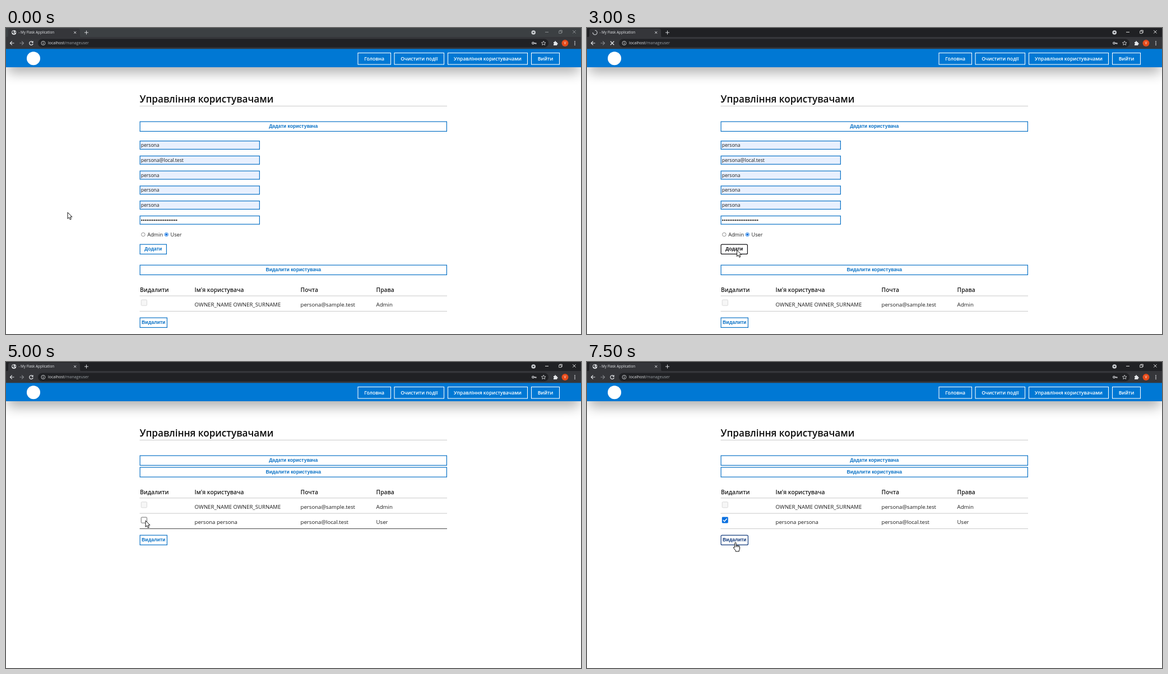
Recreate the animation shown at these times as an HTML page. Size 1026x546 px, loop 8 s.

```html
<!DOCTYPE html>
<html lang="uk">
<head>
<meta charset="utf-8">
<title>My Flask Application</title>
<style>
html, body { margin: 0; width: 100%; height: 100%; overflow: hidden; background: #fff; }
svg { display: block; width: 100%; height: 100%; }
text { white-space: pre; }
</style>
</head>
<body>
<svg id="stage" viewBox="0 0 1026 546" xmlns="http://www.w3.org/2000/svg">
  <defs>
    <filter id="blur" x="-10%" y="-200%" width="120%" height="500%"><feGaussianBlur stdDeviation="11"/></filter>
  </defs>
  <rect width="1026" height="546" fill="#fff"/>
  <rect x="3" y="45" width="1020" height="35" fill="#000" opacity=".31" filter="url(#blur)"/>
  <g id="page"></g>
  <g id="browser"></g>
  <g id="cursor"></g>
</svg>
<script>
const STEP = 250, LOOP = 8000;
const BLUE = '#0a72c6', NAVY = '#123a7c', BLACK = '#101014';
const OPEN = "'Open Sans', sans-serif", ARIAL = "'Liberation Sans', Arial, sans-serif";
const PERSON = 'persona', MAIL = 'persona@local.test';
const COLS = [239, 336.6, 525.6, 660.6];
const SUBMIT = 10, RELOADED = 13, FONT_READY = 14, LOADED = 15, CHECKED = 22;

// pointer hot spot: step, x, y
const PATH = [
  [0, 110, 329], [1, 121, 336], [2, 160, 360], [3, 212, 388], [4, 258, 407], [5, 274, 410],
  [6, 274, 400], [8, 271, 397], [10, 268, 396], [14, 267, 396.5], [15, 276, 390], [17, 323.5, 346.5],
  [18, 302, 312], [19, 260, 285], [20, 249, 283], [24, 248, 282], [25, 248, 282],
  [26, 253, 302], [27, 262, 318], [28, 267, 325], [29, 266, 326], [30, 265, 322], [31, 265, 322]
];

const $ = id => document.getElementById(id);

function pointer(step) {
  const i = Math.max(1, PATH.findIndex(p => p[0] >= step));
  const [s0, x0, y0] = PATH[i - 1], [s1, x1, y1] = PATH[i];
  const k = (step - s0) / (s1 - s0);
  return { x: x0 + (x1 - x0) * k, y: y0 + (y1 - y0) * k };
}

const rect = (x, y, w, h, fill, more = '') =>
  `<rect x="${x}" y="${y}" width="${w}" height="${h}" fill="${fill}" ${more}/>`;

const line = (d, color, width = 1, more = '') =>
  `<path d="${d}" fill="none" stroke="${color}" stroke-width="${width}" ${more}/>`;

const text = (s, x, y, size, { font = OPEN, weight = 400, color = '#1c1c1c', anchor = 'start' } = {}) =>
  `<text x="${x}" y="${y}" font-family="${font}" font-size="${size}" font-weight="${weight}" fill="${color}" text-anchor="${anchor}">${s}</text>`;

const box = (x, y, w, h, fill, color, more = '') =>
  rect(x + .6, y + .6, w - 1.2, h - 1.2, fill, `stroke="${color}" stroke-width="1.2" ${more}`);

function button(label, x, y, w, color = BLUE) {
  return box(x, y, w, 18.5, '#fff', color, color === BLUE ? '' : 'rx="2"') +
    text(label, x + w / 2, y + 11.7, 8.66, { font: ARIAL, weight: 700, color, anchor: 'middle' });
}

function checkbox(y, { disabled, checked, hover } = {}) {
  if (checked) {
    return rect(240.8, y, 11, 11, hover ? '#0757b8' : '#0a70e0', 'rx="1.4"') +
      line(`M243 ${y + 5.6}l2.3 2.4 4.3 -5`, '#fff', 1.5);
  }
  const edge = disabled ? '#d2d2d2' : hover ? '#444' : '#767676';
  return rect(241.2, y + .5, 10.2, 10.2, disabled ? '#f6f6f6' : '#fff', `stroke="${edge}" stroke-width=".8" rx="1.3"`);
}

function radio(x, on) {
  return `<circle cx="${x}" cy="368.5" r="3.3" fill="#fff" stroke="${on ? '#0a70e0' : '#767676'}" stroke-width=".8"/>` +
    (on ? `<circle cx="${x}" cy="368.5" r="2" fill="#0a70e0"/>` : '');
}

const rule = (y, color = '#c9c9c9') => rect(238.5, y - .5, 548.5, 1, color);

function nav(fallback) {
  const font = fallback ? ARIAL : OPEN;
  const items = fallback
    ? [['Головна', 635, 693.5], ['Очистити події', 699.5, 787], ['Управління користувачами', 793, 932], ['Вийти', 938.5, 988]]
    : [['Головна', 627.5, 687], ['Очистити події', 692.5, 782], ['Управління користувачами', 788, 931], ['Вийти', 937, 988]];
  return rect(0, 37, 1026, 33, '#0078d4') + '<circle cx="49" cy="54.2" r="12" fill="#fff"/>' +
    items.map(([s, a, b]) => rect(a + .5, 44.5, b - a - 1, 20.5, 'none', 'stroke="#fff" stroke-width="1.07"') +
      text(s, (a + b) / 2, 57.9, 8.66, { font, weight: fallback ? 700 : 600, color: '#fff', anchor: 'middle' })).join('');
}

function form(color) {
  const values = [PERSON, MAIL, PERSON, PERSON, PERSON, ''];
  let out = values.map((s, i) => {
    const y = 201 + i * 26.75;
    return box(238.5, y, 214.5, 16, s ? '#e8f0fe' : '#fff', BLUE) + text(s, 240.8, y + 11.1, 8.55);
  }).join('');
  for (let i = 0; i < 20; i++) out += `<circle cx="${242.2 + i * 3.27}" cy="343" r="1.15" fill="#111"/>`;
  return out + radio(244.8) + text('Admin', 252.3, 371.9, 9.1) +
    radio(286.2, true) + text('User', 293.6, 371.9, 9.1) + button('Додати', 238.5, 385.5, 48.5, color);
}

function table(top, rows, { font, bold, extra, check, rowHover, color }) {
  const cells = (list, y, size, weight) =>
    list.map((s, i) => text(s, COLS[i], y, size, { font, weight })).join('');
  const bottom = top + 27.3 * rows.length + extra;
  let out = cells(['Видалити', "Ім'я користувача", 'Почта', 'Права'], top - 6.8, 10.26, bold) + rule(top);
  rows.forEach((row, i) => {
    const y = top + i * (27.3 + extra);
    out += cells(['', ...row], y + 18.8, 9.62, 400) +
      checkbox(y + 6.5, i ? check : { disabled: true }) +
      rule(y + 27.4 + extra / 2, i && rowHover ? '#444' : '#c9c9c9');
  });
  return out + button('Видалити', 238.5, bottom + 11.2, 49.5, color);
}

const within = (p, top, bottom) => p.x > 238 && p.x < 288 && p.y > top && p.y < bottom;

function page(step, p, hand) {
  const fresh = step >= RELOADED;
  const fallback = fresh && step < FONT_READY;
  const font = fallback ? ARIAL : OPEN, bold = fallback ? 700 : 600;
  const hover = hand ? NAVY : BLUE;
  const rows = [['OWNER_NAME OWNER_SURNAME', 'persona@sample.test', 'Admin']];
  if (fresh) rows.push([`${PERSON} ${PERSON}`, MAIL, 'User']);
  return nav(fallback) +
    text('Управління користувачами', 238.6, fallback ? 132.3 : 132.8, 17.1, { font, weight: bold, color: '#0c0c0c' }) + rule(139.3) +
    button('Дадати користувача', 238.5, 166.5, 548.5) +
    (fresh ? '' : form(step >= SUBMIT ? BLACK : hover)) +
    button('Видалити користувача', 238.5, fresh ? 187.3 : 422.5, 548.5) +
    table(fresh ? 242.7 : 478, rows, {
      font, bold, extra: fallback ? .5 : 0,
      check: { checked: step >= CHECKED, hover: within(p, 276, 288) && p.x < 252 },
      rowHover: fresh && p.y > 270 && p.y < 298,
      color: fresh ? hover : BLUE
    });
}

function browser(step) {
  const active = step >= SUBMIT, loading = active && step < LOADED;
  const ink = '#e4e6e9', grey = '#85888c';
  const win = active ? '#f2f2f2' : '#95989b', frame = active ? '#202124' : '#3c4043';
  const tabIcon = loading
    ? line('M14.2 4.2A3.9 3.9 0 1 1 10.3 8.1', '#d5d8dc', 1.1, `transform="rotate(${(step - 12) * 90} 14.2 8.1)"`)
    : '<circle cx="14.2" cy="8.1" r="4.1" fill="#e4e6e9"/><path d="M11 6.5l2.2-1.7 1.3 1-1 1.6 1.8 1.3-.9 2.5-1.4-1.9-2-.6zM15.8 6l1.8 1-.4 2-1.5-1z" fill="#45474b"/>';
  const reload = loading
    ? line('M41.8 23.8l6.4 6.4M48.2 23.8l-6.4 6.4', ink, 1.3)
    : line('M47.5 25A3.3 3.3 0 1 0 48.2 28', ink, 1.2) + `<path d="M48.6 23v3.4h-3.4z" fill="${ink}"/>`;
  const dots = [24.1, 27, 29.9].map(y => `<circle cx="1015" cy="${y}" r=".9" fill="${ink}"/>`).join('');
  return rect(0, 0, 1026, 17, frame) + rect(0, 16, 1026, 21.3, '#35363a') +
    '<path d="M0 17Q4 17 4 13V5Q4 1 8 1H128Q132 1 132 5V13Q132 17 136 17Z" fill="#35363a"/>' +
    tabIcon + text('- My Flask Application', 22.4, 10.4, 6.35, { color: ink }) +
    line('M121.2 6.1l4 4M125.2 6.1l-4 4', ink, .9) + line('M140 8.1h7M143.5 4.6v7', ink, .9) +
    rect(57, 19.5, 911, 15, '#202124', 'rx="7.5"') +
    line('M14.5 27H7.4M10.8 23.6L7.4 27l3.4 3.4', ink, 1.2) +
    line('M24.4 27h7.1M28.1 23.6l3.4 3.4-3.4 3.4', grey, 1.1) + reload +
    line('M66.4 26.4v2.8M66.4 24.5v1', ink, .9) + `<circle cx="66.4" cy="27" r="3.5" fill="none" stroke="${ink}" stroke-width=".8"/>` +
    text(`localhost<tspan fill="#9aa0a6">/manageuser</tspan>`, 75, 29.4, 7.03, { color: ink }) +
    `<circle cx="940.4" cy="27" r="1.7" fill="none" stroke="${ink}" stroke-width="1.1"/>` + line('M942 27h3.8v1.7M944 27v1.4', ink, 1.2) +
    `<path d="M959.2 23.3l1.1 2.5 2.7.2-2 1.8.6 2.6-2.4-1.4-2.4 1.4.6-2.6-2-1.8 2.7-.2z" fill="none" stroke="${ink}" stroke-width=".8"/>` +
    `<path d="M977 25h2v-.7a1.1 1.1 0 0 1 2.2 0v.7h2v2h.5a1.1 1.1 0 0 1 0 2.2h-.5V31H977v-2a1.2 1.2 0 0 0 0-2.3z" fill="${ink}"/>` +
    '<circle cx="997.5" cy="27" r="6" fill="#e64a19"/>' + text('V', 997.5, 29.4, 6.6, { color: '#fff', anchor: 'middle' }) + dots +
    `<circle cx="941.2" cy="8" r="3.8" fill="#c9ccd0"/><path d="M939.3 7h3.8l-1.9 2.5z" fill="${frame}"/>` +
    line('M962 7.4h6M1011.2 4.2l5.4 5.4M1016.6 4.2l-5.4 5.4', win, .9) +
    line('M986.7 5.4h4.2v4.2h-4.2zM988 5.2V4.1h4.3v4.3h-1.2', win, .8);
}

function cursor(p, hand) {
  const shape = hand
    ? '<path d="M2.7 1.2Q2.7 0 3.9 0T5.1 1.2V5.1Q6.4 4.4 7.3 5.5Q8.6 5 9.4 6.1Q11.5 5.7 11.5 7.7V11Q11.5 12.5 10.3 14V16H4.1V14.4L.6 9.9Q-.2 8.7.8 8.1Q1.7 7.7 2.7 9Z"/><path d="M5.2 5v3.2M7.3 5.6v2.6M9.4 6.2v2.2" fill="none"/>'
    : '<path d="M0 0V11.3L2.6 8.9 4.3 12.9 6.3 12 4.6 8.1H8Z"/>';
  return `<g transform="translate(${p.x - (hand ? 4 : 0)} ${p.y})" fill="#fff" stroke="#111" stroke-width="1" stroke-linejoin="round">${shape}</g>`;
}

let shown = -1;
function draw(step) {
  if (step === shown) return;
  shown = step;
  const p = pointer(step);
  const hand = step < SUBMIT ? within(p, 386, 404) : step >= LOADED && within(p, 309, 327);
  $('page').innerHTML = page(step, p, hand);
  $('browser').innerHTML = browser(step);
  $('cursor').innerHTML = cursor(p, hand);
}

const start = performance.now();
function tick() {
  draw(Math.floor((performance.now() - start) % LOOP / STEP));
  requestAnimationFrame(tick);
}
tick();
</script>
</body>
</html>
```
